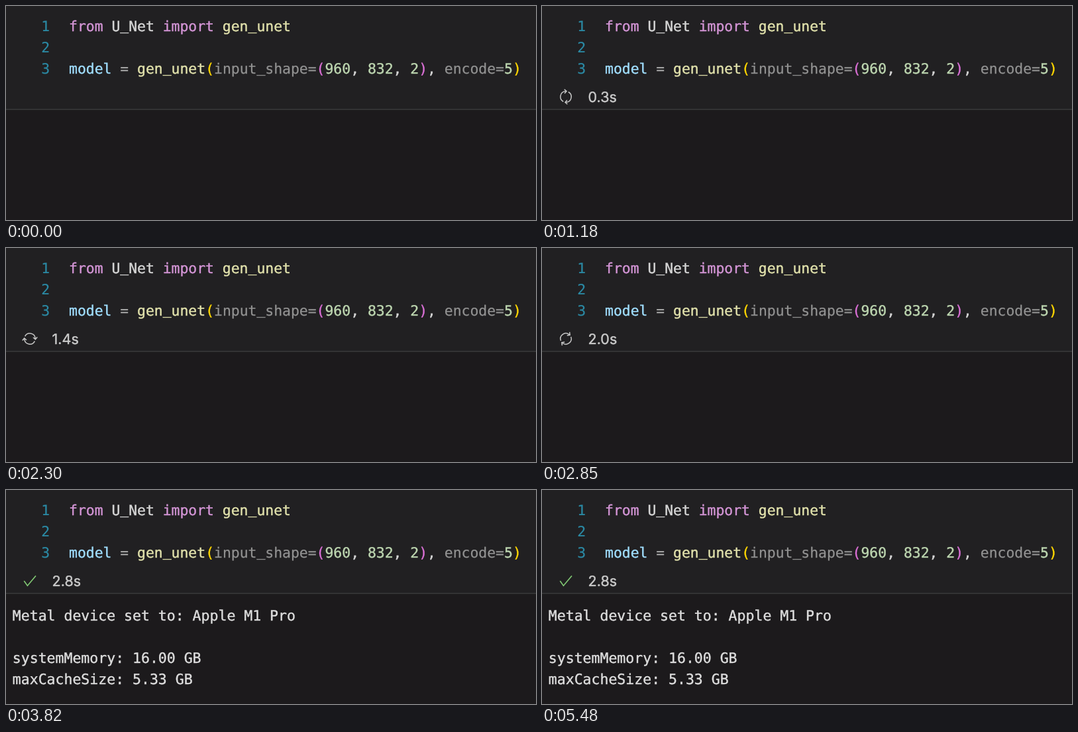
An HTML page for the animation above (5510 ms loop, 800x323 px).

```html
<!DOCTYPE html>
<html lang="en">
<head>
<meta charset="utf-8">
<title>Notebook cell run</title>
<style>
html, body { margin: 0; width: 100%; height: 100%; overflow: hidden; background: #1c1a1c; }
svg { display: block; }
text { white-space: pre; text-rendering: geometricPrecision; color: #d6d6d6;
  font: 21.4px "DejaVu Sans Mono", monospace; }
/* a thin outline gives the slightly heavier strokes */
text, tspan { fill: currentColor; stroke: currentColor; stroke-width: .4px; }
#output text { font-size: 21.5px; color: #dedede; }
#status text { font: 21.5px Inter, sans-serif; color: #cccccc; }
text.line { color: #2b8aa5; stroke-width: .2px; }
.key { color: #d495d6; }
.fn { color: #e2e2ac; }
.var { color: #a0deff; }
.arg { color: #929292; stroke-width: .25px; }
.op { color: #b8b8b8; stroke-width: 0; }
.num { color: #bdd6b0; }
.outer { color: #ffd700; }
.inner { color: #da70d6; }
.low { baseline-shift: 2px; }
.icon { fill: none; stroke: #c5c5c5; }
#check { stroke: #80c873; stroke-width: 1.1; }
</style>
</head>
<body>
<svg width="800" height="323" viewBox="0 0 800 323">
  <rect width="800" height="156" fill="#212022"/>
  <rect y="155.5" width="800" height="1.2" fill="#414042"/>

  <text class="line" x="53.3" y="38">1</text>
  <text class="line" x="53.3" y="70">2</text>
  <text class="line" x="53.3" y="102">3</text>
  <text x="95" y="38"><tspan class="key">from</tspan> U<tspan class="low">_</tspan>Net <tspan class="key">import</tspan> <tspan class="fn">gen<tspan class="low">_</tspan>unet</tspan></text>
  <text x="95" y="102"><tspan class="var">model</tspan> <tspan class="op">=</tspan> <tspan class="fn">gen<tspan class="low">_</tspan>unet</tspan><tspan class="outer">(</tspan><tspan class="arg">input<tspan class="low">_</tspan>shape=</tspan><tspan class="inner">(</tspan><tspan class="num">960</tspan>, <tspan class="num">832</tspan>, <tspan class="num">2</tspan><tspan class="inner">)</tspan>, <tspan class="arg">encode=</tspan><tspan class="num">5</tspan><tspan class="outer">)</tspan></text>

  <g id="status">
    <g class="icon" transform="translate(36 137) scale(1.5)">
      <g id="spinner">
        <path id="arrow" d="M-7.6 1.1L-5.5-1l2.1 2.1M-5.5-1V.2A5.5 5.5 0 0 0 4.7 2.8"/>
        <use href="#arrow" transform="rotate(180)"/>
      </g>
      <path id="check" d="M-5.8.2L-2.4 5 6-5"/>
    </g>
    <text id="clock" x="69.6" y="145"></text>
  </g>

  <g id="output">
    <text x="9.8" y="196.5">Metal device set to: Apple M1 Pro</text>
    <text x="9.8" y="261">systemMemory: 16.00 GB</text>
    <text x="9.8" y="293">maxCacheSize: 5.33 GB</text>
  </g>
</svg>
<script>
const LOOP = 5510, RUN = 790, CLOCK = 820, PRINT = 3150, DONE = 3670;
const TURN = 1500, LEVEL = 2320;  // spinner period, and a time when it lies level
const el = id => document.getElementById(id);
const show = (id, on) => el(id).setAttribute('visibility', on ? 'inherit' : 'hidden');
const start = performance.now();

function draw() {
  const t = (performance.now() - start) % LOOP;
  const tenths = Math.min(28, Math.max(0, Math.floor((t - CLOCK) / 100)));
  show('status', t >= RUN);
  show('spinner', t < DONE);
  show('check', t >= DONE);
  show('output', t >= PRINT);
  el('clock').textContent = (tenths / 10).toFixed(1) + 's';
  el('spinner').setAttribute('transform', `rotate(${(t - LEVEL) * 360 / TURN})`);
  requestAnimationFrame(draw);
}
draw();
</script>
</body>
</html>
```
